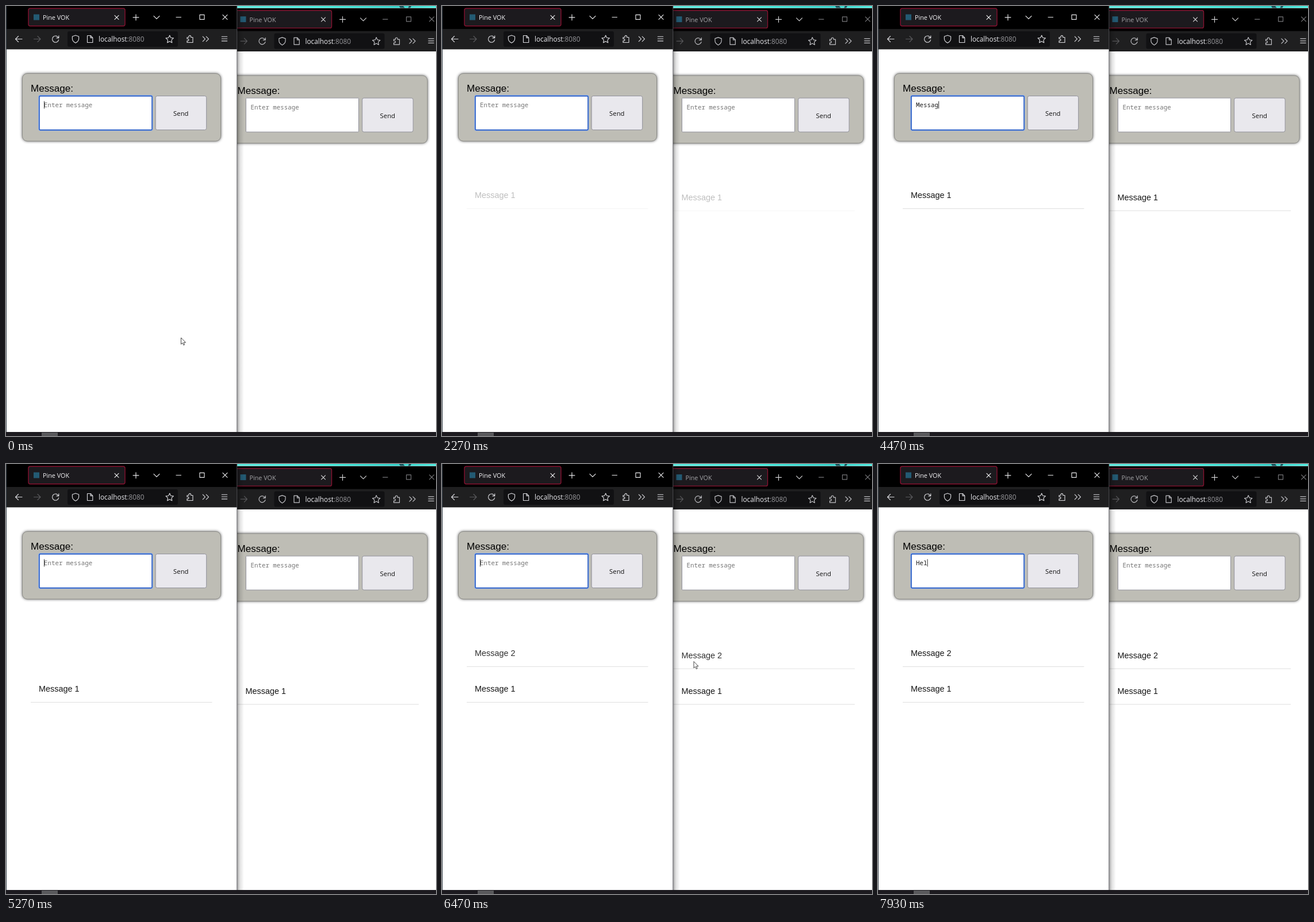
An HTML page that plays this animation: 748 by 748 pixels, repeating every 8000 ms.

```html
<!DOCTYPE html>
<html lang="en">
<head>
<meta charset="utf-8">
<title>Message board</title>
<style>
  html, body { margin: 0; width: 100%; height: 100%; overflow: hidden; background: #fff; }
  svg { display: block; width: 748px; height: 748px; }
  text { white-space: pre; }
  .ui { font-family: "Open Sans", "Noto Sans", sans-serif; }
  .page { font-family: "Liberation Sans", Arial, sans-serif; }
  .mono { font: 10.8px "Noto Sans Mono", "DejaVu Sans Mono", monospace; }
  .icon { fill: none; stroke-width: 1.15; stroke-linecap: round; stroke-linejoin: round; }
  .panel { filter: drop-shadow(0 0 2.5px rgba(0, 0, 0, .75)); }
</style>
</head>
<body>
<svg id="stage" viewBox="0 0 748 748" xmlns="http://www.w3.org/2000/svg"></svg>
<script>
const LOOP = 8000, BLINK = 530, FADE = 2000, ROW = 62;
const TEXT_X = 66, CHAR = 6.52;

// [time, text in the field]
const typing = [
  [0, ''], [200, 'M'], [330, 'Me'], [530, 'Mes'], [730, 'Mess'], [870, 'Messa'],
  [1070, 'Messag'], [1200, 'Message'], [1330, 'Message '], [1600, 'Message 1'], [1870, ''],
  [3070, 'M'], [3330, 'Me'], [3530, 'Mes'], [3870, 'Mess'], [4130, 'Messa'],
  [4330, 'Messag'], [4530, 'Message'], [4870, 'Message '], [5100, 'Message 2'], [5270, ''],
  [7470, 'H'], [7730, 'He'], [7930, 'Hel']
];
const sent = [1890, 5270];

// [time, x, y] of the pointer tip
const path = [[0, 304.5, 577], [6070, 304.5, 577], [6470, 438, 343.5], [6600, 438, 343.5], [6900, 459, 332]];
const pointerShown = t => t < 200 || (t >= 6000 && t < 7470);

const icon = (d, color, extra = '') => `<path class="icon" d="${d}" stroke="${color}" ${extra}/>`;
const label = (x, y, size, cls, fill, s, extra = '') =>
  `<text x="${x}" y="${y}" font-size="${size}" class="${cls}" fill="${fill}" ${extra}>${s}</text>`;

function toolbar(active) {
  const title = active ? '#f4f4f6' : '#a5a5a8';
  const ctl = active ? '#e8e8ea' : '#77777a';
  const tool = active ? '#d8d8dc' : '#c2c2c6';
  const tab = active ? '#e8e8ea' : '#d0d0d2';
  return `
    <rect width="402" height="41" fill="#000"/>
    <rect y="40" width="402" height="35.4" fill="#1f1f20"/>
    <rect x="39" y="4.2" width="168" height="30.6" rx="3" fill="#1c1a1e" stroke="#86112f" stroke-width="1.4"/>
    <rect x="48" y="14.5" width="10" height="10" fill="#235a73"/>
    ${label(64, 24, 10.8, 'ui', title, 'Pine VOK')}
    ${icon('M189 16.3l7 7m0-7l-7 7', tab)}
    ${icon('M221 19.8h10m-5-5v10', tab)}
    ${icon('M257 17.3l5 5 5-5', tab)}
    ${icon('M296 19.5h8.5', ctl)}
    ${icon('M337 15.3h8v8h-8z', ctl)}
    ${icon('M377 15.3l8 8m0-8l-8 8', ctl)}
    <rect x="107" y="44" width="192" height="27" rx="3" fill="#111113"/>
    ${icon('M28 57.5H16.5m5-5l-5 5 5 5', tool)}
    ${icon('M48.5 57.5H60m-5-5l5 5-5 5', '#59595c')}
    ${icon('M91.2 55.2a5.6 5.6 0 1 0 .4 3.6M91.8 51.8v3.8h-3.9', tool)}
    ${icon('M121 51l5.6 2v4c0 3.6-2.6 5.8-5.6 7.3-3-1.5-5.6-3.7-5.6-7.3v-4z', tool)}
    ${icon('M141.5 51.5h5.7l3.6 3.6v8.4h-9.3zM147 51.7v3.6h3.6', tool)}
    <text x="161" y="62" font-size="11.8" class="ui" fill="#ececf0">localhost<tspan fill="#96969a">:8080</tspan></text>
    ${icon('M284.7 51l2 4.3 4.7.6-3.5 3.2.9 4.7-4.1-2.4-4.1 2.4.9-4.7-3.5-3.2 4.7-.6z', tool)}
    ${icon('M315 54.5h3v-1.3a1.8 1.8 0 0 1 3.6 0v1.3h3.4v9h-10v-2.9h1.3a1.7 1.7 0 0 0 0-3.4H315z', tool)}
    ${icon('M342.3 53.2l4.2 4.2-4.2 4.2m6-8.4l4.2 4.2-4.2 4.2', tool)}
    ${icon('M375.3 53.2h9.4m-9.4 3.8h9.4m-9.4 3.8h9.4', tool)}`;
}

const row = n => `
  <g class="row${n}">
    ${label(57, 334, 14.4, 'page', '#151515', 'Message ' + n)}
    <path d="M43 352.5H358.5" stroke="#dedede"/>
  </g>`;

function page(active) {
  const border = active
    ? `<rect x="56.2" y="154.8" width="199.4" height="62.4" rx="3.5" fill="#8fb0ea"/>
       <rect x="58" y="156.6" width="196" height="59" rx="1.5" fill="#fff" stroke="#2459c4" stroke-width="1.6"/>`
    : `<rect x="58" y="156.5" width="196" height="59" rx="1" fill="#fff" stroke="#92929c" stroke-width="1"/>`;
  return `
    <rect class="panel" x="28.5" y="117.5" width="345" height="117.5" rx="8.5" fill="#bebdb5"/>
    <rect x="28.5" y="117.5" width="345" height="117.5" rx="8.5" fill="none" stroke="#85857f" stroke-width=".8"/>
    ${label(43, 149, 17.1, 'page', '#000', 'Message:')}
    ${border}
    <text x="${TEXT_X}" y="176" class="mono hint" fill="#757575">Enter message</text>
    <rect x="260.2" y="156.5" width="88.5" height="59" rx="3" fill="#e9e8ed" stroke="#91919b" stroke-width="1"/>
    ${label(304.3, 191.3, 11.3, 'ui', '#111', 'Send', 'text-anchor="middle"')}
    ${row(1)}${row(2)}`;
}

const stage = document.getElementById('stage');
stage.innerHTML = `
  <defs>
    <linearGradient id="sky">
      <stop offset="0" stop-color="#5feadf"/><stop offset=".4" stop-color="#49f0e0"/>
      <stop offset=".8" stop-color="#35d3cb"/><stop offset="1" stop-color="#52eee2"/>
    </linearGradient>
    <linearGradient id="shade">
      <stop offset="0" stop-opacity=".36"/><stop offset=".4" stop-opacity=".12"/><stop offset="1" stop-opacity="0"/>
    </linearGradient>
    <clipPath id="rightClip"><rect x="402" y="3.6" width="346" height="737.6"/></clipPath>
  </defs>
  <rect width="748" height="748" fill="#1c1a1f"/>
  <rect x="62" y="742" width="28" height="6" fill="#59595c"/>
  <rect x="402" width="346" height="4" fill="url(#sky)"/>
  <path d="M684 0h7l3 4h-8zM701 0h4l-2 4h-4z" fill="#14565e"/>
  <g clip-path="url(#rightClip)">
    <rect x="402" width="346" height="741" fill="#fff"/>
    <g transform="translate(359.5 3.6)">${toolbar(false)}${page(false)}</g>
    <rect x="402" y="4" width="12" height="738" fill="url(#shade)"/>
  </g>
  <rect width="402" height="741" fill="#fff"/>
  ${toolbar(true)}${page(true)}
  <path d="M.5 0V741" stroke="#3c4650"/>
  <path d="M401.8 0V741" stroke="#55555a" stroke-width=".9"/>
  <text id="typed" x="${TEXT_X}" y="176" class="mono" fill="#1c1c1c"></text>
  <rect id="caret" y="165.5" width="1" height="13" fill="#333"/>
  <path id="pointer" d="M0 0V11.4L2.6 9 4.4 13 6.2 12.2 4.5 8.3H8z" fill="#fff" stroke="#333" stroke-width=".9" stroke-linejoin="round"/>`;

const byId = id => document.getElementById(id);
const typed = byId('typed'), caret = byId('caret'), pointer = byId('pointer');
const hint = stage.querySelector('.hint + rect') && stage.querySelectorAll('.hint')[1];
const rows = [1, 2].map(n => stage.querySelectorAll('.row' + n));

// cubic-bezier(.25, .1, .25, 1)
function ease(x) {
  if (x <= 0) return 0;
  if (x >= 1) return 1;
  const curve = (a, b, u) => 3 * a * u * (1 - u) ** 2 + 3 * b * u * u * (1 - u) + u ** 3;
  let lo = 0, hi = 1;
  for (let i = 0; i < 20; i++) {
    const mid = (lo + hi) / 2;
    if (curve(.25, .25, mid) < x) lo = mid; else hi = mid;
  }
  return curve(.1, 1, lo);
}

function tipAt(t) {
  const i = path.findIndex(p => p[0] > t);
  if (i < 0) return path[path.length - 1].slice(1);
  const [t0, x0, y0] = path[i - 1], [t1, x1, y1] = path[i];
  const u = (t - t0) / (t1 - t0), k = u * u * (3 - 2 * u);
  return [x0 + (x1 - x0) * k, y0 + (y1 - y0) * k];
}

function draw(t) {
  const past = typing.filter(s => s[0] <= t);
  const value = past[past.length - 1][1];
  const lastKey = past.reduce((key, s) => s[1] ? s[0] : key, 0);
  typed.textContent = value;
  hint.style.display = value ? 'none' : '';
  caret.setAttribute('x', TEXT_X + value.length * CHAR);
  caret.style.display = Math.floor((t - lastKey) / BLINK) % 2 ? 'none' : '';

  rows.forEach((pair, i) => pair.forEach(el => {
    el.setAttribute('opacity', ease((t - sent[i]) / FADE));
    el.setAttribute('transform', `translate(0 ${i === 0 && t >= sent[1] ? ROW : 0})`);
  }));

  pointer.style.display = pointerShown(t) ? '' : 'none';
  pointer.setAttribute('transform', `translate(${tipAt(t)})`);
}

const start = performance.now();
function tick() {
  draw((performance.now() - start) % LOOP);
  requestAnimationFrame(tick);
}
tick();
</script>
</body>
</html>
```
